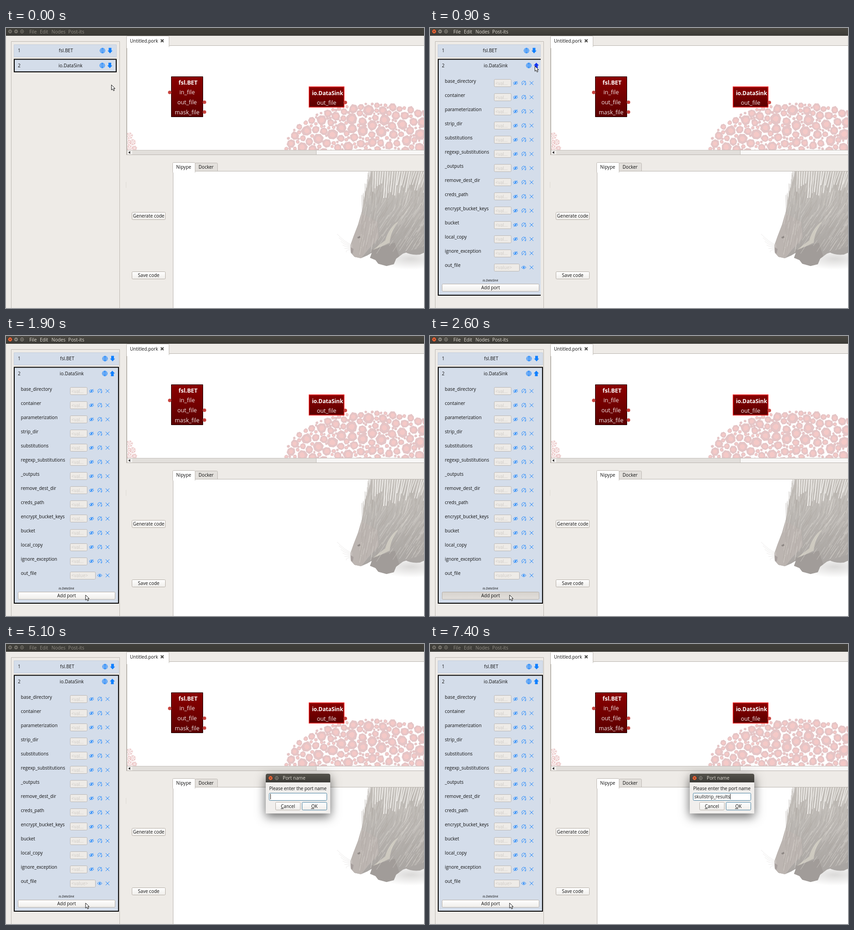
Write an HTML page with a canvas that moves like this. It is 914x613 px and loops after 8000 ms.

```html
<!DOCTYPE html>
<html lang="en">
<head>
<meta charset="utf-8">
<title>Node editor</title>
<style>
html, body { margin: 0; width: 100%; height: 100%; overflow: hidden; background: #eeebe7; }
canvas { display: block; }
</style>
</head>
<body>
<canvas id="stage" width="914" height="613"></canvas>
<script>
const W = 914, H = 613, LOOP = 8000;
const BLUE = '#1080ff', HOVER = '#1233f2', ROW = '#d4ddea', BG = '#eeebe7';
const view = document.getElementById('stage').getContext('2d');
let c = view;

function seeded(s) {
  return () => (s = (s * 16807) % 2147483647) / 2147483647;
}

function rect(x, y, w, h, fill) {
  c.fillStyle = fill;
  c.fillRect(x, y, w, h);
}

function box(x, y, w, h, fill, line, r = 0, lw = 1) {
  c.beginPath();
  c.roundRect(x + lw / 2, y + lw / 2, w - lw, h - lw, r);
  c.fillStyle = fill;
  c.fill();
  c.strokeStyle = line;
  c.lineWidth = lw;
  c.stroke();
}

function text(s, x, y, { size = 10, color = '#111', align = 'left', style = '' } = {}) {
  c.font = `${style} ${size}px "Open Sans", "Noto Sans", sans-serif`;
  c.textAlign = align;
  c.fillStyle = color;
  c.fillText(s, x, y);
}

const mid = (s, x, y, o) => text(s, x, y, { align: 'center', ...o });

function vertical(y0, y1, a, b) {
  const g = c.createLinearGradient(0, y0, 0, y1);
  g.addColorStop(0, a);
  g.addColorStop(1, b);
  return g;
}

function dot(x, y, r, fill) {
  c.beginPath();
  c.arc(x, y, r, 0, 7);
  c.fillStyle = fill;
  c.fill();
}

function stroke(d, color, lw = 1) {
  c.strokeStyle = color;
  c.lineWidth = lw;
  c.stroke(new Path2D(d));
}

function shape(d, fill) {
  c.fillStyle = fill;
  c.fill(new Path2D(d));
}

function at(x, y, draw) {
  c.save();
  c.translate(x, y);
  draw();
  c.restore();
}

function button(label, x, y, w, h, pressed, line = '#b5aea6') {
  const fill = pressed ? vertical(y, y + h, '#d6d2cd', '#e2dfdb') : vertical(y, y + h, '#ffffff', '#efedea');
  box(x, y, w, h, fill, line, 2);
  mid(label, x + w / 2, y + h / 2 + 3.7);
}

// ---------- icons ----------
function globe(x, y) {
  at(x, y, () => {
    stroke('M-5.5 0A5.5 5.5 0 1 0 5.5 0A5.5 5.5 0 1 0-5.5 0H5.5M0-5.5V5.5M-4.6-2.8H4.6M-4.6 2.8H4.6' +
      'M0-5.5Q-5 0 0 5.5Q5 0 0-5.5', BLUE, 0.9);
  });
}

function arrow(x, y, dir, color) {
  at(x, y, () => {
    c.scale(1, dir);
    shape('M-3-6H3V0H5.5L0 6L-5.5 0H-3Z', color);
  });
}

function eye(x, y, crossed) {
  at(x, y, () => {
    stroke('M-5 0Q0-6 5 0Q0 6-5 0Z', BLUE, 0.9);
    dot(0, 0, 1.6, BLUE);
    if (crossed) stroke('M-4 4L4-4', BLUE);
  });
}

function unlink(x, y) {
  at(x, y, () => stroke('M-3 3A4.3 4.3 0 1 1 3.5 2.5M-4 4.5L4-4.5M1.5 2.5L3.6 4.5L5 1.5', BLUE, 0.9));
}

function cross(x, y) {
  at(x, y, () => stroke('M-4-4L4 4M-4 4L4-4', BLUE));
}

function pointer(x, y) {
  at(x, y, () => {
    const d = 'M0 0V11.2L2.6 8.8L4.5 13L6.6 12L4.7 8H8Z';
    shape(d, '#fff');
    stroke(d, '#111');
  });
}

function windowButtons(xs, y, active) {
  xs.forEach((x, i) => {
    const close = i === 0;
    dot(x, y, 5, '#2f2e2a');
    dot(x, y, 4.4, close && active ? '#ee6536' : active ? '#85827a' : '#716e67');
    at(x, y, () => {
      const last = i === xs.length - 1;
      stroke(close ? 'M-1.8-1.8L1.8 1.8M-1.8 1.8L1.8-1.8' : last ? 'M-2-1.8H2V1.8H-2Z' : 'M-2 0H2', '#35342f');
    });
  });
}

// ---------- pictures ----------
function blob(x, y, r, fill, rnd) {
  c.beginPath();
  const n = 7, turn = rnd() * 6;
  for (let i = 0; i < n; i++) {
    const a = turn + i * 2 * Math.PI / n, q = r * (0.88 + rnd() * 0.28);
    c.lineTo(x + q * Math.cos(a), y + q * Math.sin(a));
  }
  c.closePath();
  c.fillStyle = fill;
  c.strokeStyle = fill;
  c.lineJoin = 'round';
  c.lineWidth = 1.2;
  c.fill();
  c.stroke();
}

function dome() {
  const rnd = seeded(77), cells = [];
  const inside = (x, y, r) => ((x - 806) / (200 - r)) ** 2 + ((y - 271) / (108 - r)) ** 2 < 1;
  const tries = 14000;
  for (let i = 0; i < tries; i++) {
    const r = 2 + 8.5 * (1 - i / tries) ** 1.5 * (0.75 + rnd() * 0.4);
    const x = 600 + rnd() * 325, y = 155 + rnd() * 122;
    if (inside(x, y, r) && cells.every(k => Math.hypot(k[0] - x, k[1] - y) > (k[2] + r) * 0.98 + 0.5)) cells.push([x, y, r]);
  }
  for (const [x, y, r] of cells) {
    blob(x, y, r, '#e5c5c6', rnd);
    if (r > 3) blob(x, y, r * 0.5, '#f4c9c7', rnd);
  }
}

function flowers() {
  for (const [x, y, r] of [[270, 236, 8], [266, 251, 8], [277, 250, 7], [271, 264, 8], [281, 263, 5]]) {
    for (let i = 0; i < 6; i++) {
      at(x, y, () => {
        c.rotate(i * Math.PI / 3 + x);
        stroke(`M1 0H${r}M${r * 0.5} 0l2.5-2.5M${r * 0.5} 0l2.5 2.5`, '#ecc8c8', 1.3);
      });
    }
  }
}

function porcupine() {
  const g = c.createRadialGradient(0, 0, 5, 0, 0, 75);
  g.addColorStop(0, '#dddcdb');
  g.addColorStop(1, '#ffffff');
  at(885, 505, () => {
    c.scale(1, 0.32);
    rect(-100, -80, 200, 160, g);
  });
  shape('M865 480L914 465V492L905 496Q885 498 872 490Z', '#a9a5a2');
  const body = 'M799 314L785 362L779 398L770 430L760 456L753 476L754 492L762 501L776 504L790 498' +
    'L800 492L796 503L808 508L814 516L832 521L848 517L853 505L868 494L914 478V314Z';
  shape(body, vertical(314, 520, '#c8c4bf', '#a6a29f'));
  c.save();
  c.clip(new Path2D(body));
  shape('M778 405L812 425L815 460L792 485L776 505H750V470Z', '#bcb5b1');
  shape('M800 485L850 470L860 500L848 521H812L795 504Z', '#a19c99');
  const rnd = seeded(31);
  for (let i = 0; i < 420; i++) {
    const x = 770 + rnd() * 150, y = 340 + rnd() * 160, len = 12 + rnd() * 22;
    const lean = y < 400 ? 0.25 : 0.65;
    stroke(`M${x} ${y}l${len * lean * (x > 810 ? 1 : 0.3)} ${-len}`, i % 3 ? '#a39d9855' : '#e4e0da99', 0.9);
  }
  c.globalAlpha = 0.55;
  shape('M858 423Q838 436 829 465L802 486Q818 480 839 470Q842 443 858 423Z', '#e8e4d5');
  c.restore();
  // quills along the upper left edge and near the cut
  for (let i = 0; i < 20; i++) {
    const x = 779 + i * 1.1, y = 410 - i * 4.3;
    stroke(`M${x} ${y}L${x - 1 + rnd() * 3} ${y - 28 - rnd() * 18}`, '#bdb8b3', 0.8);
  }
  for (let i = 0; i < 24; i++) {
    const x = 802 + i * 4.8;
    stroke(`M${x} ${338 + rnd() * 34}L${x + 1 + i * 0.5} 314`, '#f3f1ee', 1 + rnd());
  }
  for (let i = 0; i < 6; i++) {
    stroke(`M757 ${475 + i * 2}Q742 ${470 + i * 3} ${724 + i * 4} ${451 + i * 8}`, '#dfdcda', 0.6);
  }
  shape('M768 458L774 455L775 459L770 461Z', '#8f8986');
  shape('M754 480L760 484L758 494L754 491Z', '#a79f9d');
}

// ---------- fixed parts ----------
function node(x, y, w, h, line, lw) {
  box(x, y, w, h, vertical(y, y + h, '#8b0000', '#5a0000'), line, 0, lw);
}

function drawFixed() {
  rect(0, 0, W, H, BG);
  rect(263, 38, W, 240, '#b9b4ae');
  rect(265, 39, W, 228, '#fff');
  c.save();
  c.beginPath();
  c.rect(265, 39, W, 228);
  c.clip();
  dome();
  flowers();
  c.restore();
  rect(265, 267, W, 10, '#c4c0bb');
  rect(265, 268, 413, 9, '#e2dfdb');
  rect(265, 268, 11, 9, '#f1efed');
  rect(679, 268, W, 9, '#f8f7f6');
  shape('M267.5 272.5L271.5 269.5V275.5Z', '#222');
  box(263, 17, 94, 26, '#fff', '#bdb8b2', 2);
  rect(264, 38, 92, 6, '#fff');
  rect(263, 38, 1, 239, '#b9b4ae');
  text('Untitled.pork', 271, 31.5);
  stroke('M338.5 25L344.5 31M338.5 31L344.5 25', '#4a4a48', 2.3);

  const pale = { size: 12.4, color: '#f3eaea' }, title = { color: '#fff', style: 'bold' };
  node(361, 106, 70, 89, '#150000', 1);
  mid('fsl.BET', 398, 124, { ...title, size: 12.6 });
  mid('in_file', 396, 145, pale);
  mid('out_file', 396, 167, pale);
  mid('mask_file', 396, 189, pale);
  node(662, 128, 78, 46, '#f01d1d', 1.5);
  mid('io.DataSink', 703, 147, { ...title, size: 11.9 });
  mid('out_file', 701, 168, pale);
  for (const [x, y] of [[358, 141], [434, 162.5], [434, 184], [742, 163]]) dot(x, y, 3.8, '#c8443f');

  box(413, 295, 50, 22, '#e3e0dc', '#bdb8b2', 2);
  rect(365, 313, W, H, '#b9b4ae');
  rect(366, 314, W, H, '#fff');
  box(364, 294, 50, 24, '#fff', '#bdb8b2', 2);
  rect(366, 313, 47, 6, '#fff');
  mid('Nipype', 388.5, 307.5);
  mid('Docker', 437.5, 308);
  c.save();
  c.beginPath();
  c.rect(366, 314, W, H);
  c.clip();
  porcupine();
  c.restore();

  button('Generate code', 275, 403, 74, 17);
  button('Save code', 275, 533, 74, 17);
  rect(262, 337, 1, 13, '#dedad5');
  box(11, 29, 238, 600, BG, '#bcb7b1');
}

// ---------- changing parts ----------
function titleBar(active) {
  rect(0, 0, W, 17, vertical(0, 17, active ? '#4a4842' : '#403f3a', '#3b3a36'));
  windowButtons([9, 22, 35], 7.5, active);
  const color = active ? '#dfdbd2' : '#8f8b82';
  [['File', 51], ['Edit', 74], ['Nodes', 99.5], ['Post-its', 136]]
    .forEach(([s, x]) => text(s, x, 11.5, { size: 10.2, color }));
}

const ports = ['base_directory', 'container', 'parameterization', 'strip_dir', 'substitutions',
  'regexp_substitutions', '_outputs', 'remove_dest_dir', 'creds_path', 'encrypt_bucket_keys',
  'bucket', 'local_copy', 'ignore_exception', 'out_file'];

function sidebar(open, wide, hover, pressed) {
  const shift = wide ? 5.5 : 0, right = wide ? 247 : 242;
  box(17, 36, right - 17, 28, ROW, '#c3ccda');
  text('1', 26, 53);
  mid('fsl.BET', 131 + shift / 2, 53);
  globe(211 + shift, 49.5);
  arrow(227.5 + shift, 49.5, 1, BLUE);

  c.save();
  c.beginPath();
  c.rect(17, 67, right - 17, 530);
  c.clip();
  box(17, 67.5, open ? 230 : 225, open ? 518.5 : 29.5, ROW, '#000', 0, 2);
  c.restore();
  const move = open ? 5.5 : 0;
  text('2', 26, 86);
  mid('io.DataSink', 141 + move / 2, 86);
  globe(210.5 + move, 82);
  arrow(227 + move, 82, open ? -1 : 1, hover ? HOVER : BLUE);
  if (!open) return;

  ports.forEach((name, i) => {
    const y = 120.5 + i * 31.05, last = i === ports.length - 1;
    text(name, 32.5, y - 1);
    box(140, Math.round(y - 8.5), last ? 56 : 38, 17, '#eeebe7', '#bab7b4', 2);
    text(last ? '<value>' : '<val…', 143, y + 4, { color: '#cfcbc7' });
    if (last) eye(205, y, false);
    else {
      eye(187, y, true);
      unlink(205, y);
    }
    cross(222, y);
  });
  mid('io.DataSink', 132, 555, { size: 6.8, style: 'italic' });
  button('Add port', 26, 560, 213, 17, pressed);
}

// [time, characters typed by then]
const keys = [[5400, 1], [5500, 2], [5700, 3], [5800, 4], [6000, 5], [6100, 6], [6200, 7], [6400, 8], [6500, 10],
  [6800, 11], [6900, 12], [7000, 13], [7100, 14], [7200, 15], [7300, 16], [7400, 18]];

function dialog(t) {
  c.save();
  c.shadowColor = 'rgba(0,0,0,.6)';
  c.shadowBlur = 22;
  c.shadowOffsetY = 7;
  c.beginPath();
  c.roundRect(568, 284, 141, 87, [4, 4, 0, 0]);
  c.fillStyle = '#f1efed';
  c.fill();
  c.restore();
  c.beginPath();
  c.roundRect(568, 284, 141, 19, [4, 4, 0, 0]);
  c.fillStyle = vertical(284, 303, '#55534c', '#3c3b37');
  c.fill();
  windowButtons([578.5, 592], 293.5, true);
  text('Port name', 605, 297, { size: 10.2, color: '#dfdbd2', style: '500' });
  text('Please enter the port name', 575.5, 319.5, { size: 9.9 });
  box(575, 326, 127, 17, '#fff', '#467f9f', 2);
  const typed = keys.reduce((n, [at, count]) => t >= at ? count : n, 0);
  const word = 'skullstrip_results'.slice(0, typed);
  text(word, 578, 338);
  const caret = t >= 5100 || (t < 4900 && Math.floor((t - 2900) / 500) % 2 === 0);
  if (caret) rect(Math.round(578 + c.measureText(word).width), 328, 1, 12, '#111');
  button('Cancel', 589, 346, 55, 18);
  button('OK', 647, 346, 55, 18, false, '#467f9f');
  rect(601, 360, 6, 1, '#222');
  rect(667, 360, 7, 1, '#222');
}

const progress = (t, start, steps) => {
  const p = Math.max(0, Math.min(1, (Math.floor((t - start) / 100) + 1) / steps));
  return p * p * (3 - 2 * p);
};

function draw(t) {
  const open = t >= 900, asking = t >= 2900;
  const up = progress(t, 200, 6), down = progress(t, 1300, 7);
  const x = 230.5 - up - 55.5 * down, y = 124.5 - 41 * up + 483.5 * down;
  view.drawImage(fixed, 0, 0);
  titleBar(open && !asking);
  sidebar(open, t >= 1000, y < 90, t >= 2600 && !asking);
  if (asking) dialog(t);
  pointer(x, y);
}

const fixed = document.createElement('canvas');
fixed.width = W;
fixed.height = H;
c = fixed.getContext('2d');
drawFixed();
c = view;

let start;
function tick(now) {
  start ??= now;
  draw((now - start) % LOOP);
  requestAnimationFrame(tick);
}
draw(0);
requestAnimationFrame(tick);
</script>
</body>
</html>
```
